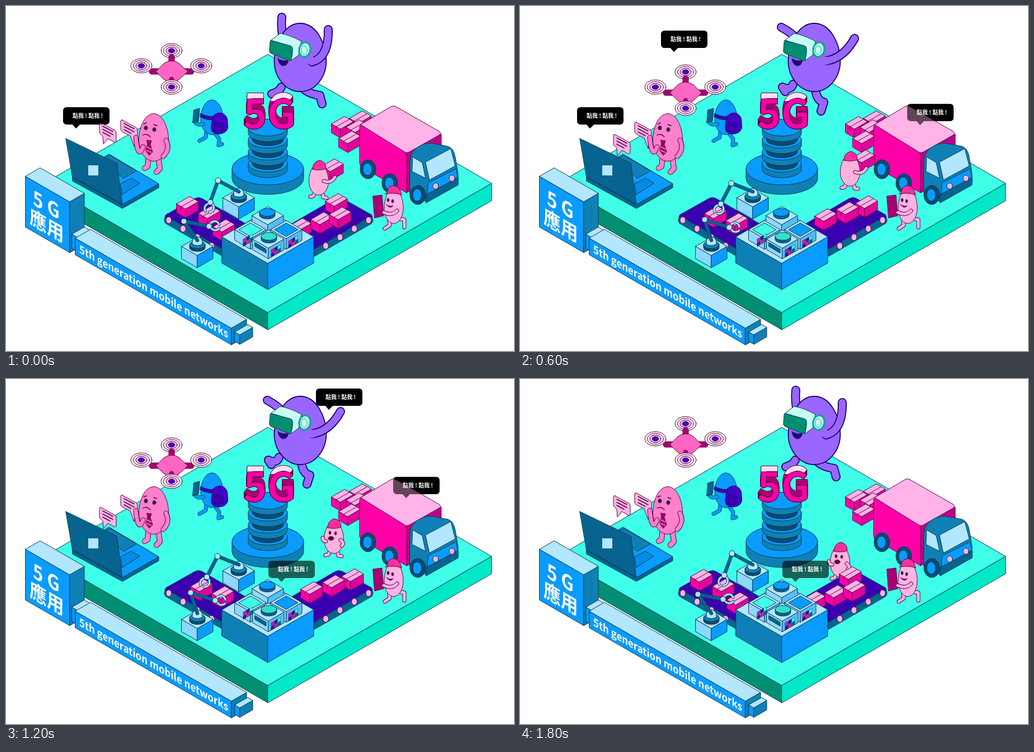
These frames come from a looping animation (908 by 617 pixels, 2100 ms). An HTML page:

```html
<!DOCTYPE html>
<html lang="zh-Hant">
<head>
<meta charset="utf-8">
<title>5G</title>
<style>
html, body { margin: 0; width: 100%; height: 100%; overflow: hidden; background: #fff; }
svg { display: block; }
text { font-family: "Noto Sans CJK TC", "Noto Sans CJK", "Noto Sans", sans-serif; font-weight: 700; stroke: none; fill: #fff; white-space: pre; }
</style>
</head>
<body>
<svg id="stage" width="908" height="617" viewBox="0 0 908 617" stroke="#063a55" stroke-linejoin="round" stroke-linecap="round"></svg>
<script>
const STEP = 300, STEPS = 7;
const sky = '#b3e6ff', blue = '#0a9bff', steel = '#0f80b5', deep = '#07638f', night = '#0a4a70';
const pale = '#ffb3e6', rose = '#ff80cc', hot = '#ff00a8', wine = '#a80074', plum = '#5c0040';
const violet = '#9966ff', indigo = '#3a00b0', dark = '#1a0066';
const aqua = '#3fffe8', green = '#008f72';

// drawing helpers
const path = (d, fill = 'none', more = '') => `<path d="${d}" fill="${fill}" ${more}/>`;
const poly = (pts, fill, more = '') => `<polygon points="${pts}" fill="${fill}" ${more}/>`;
const oval = (x, y, rx, ry, fill, more = '') => `<ellipse cx="${x}" cy="${y}" rx="${rx}" ry="${ry}" fill="${fill}" ${more}/>`;
const group = (x, y, body, more = '') => `<g transform="translate(${x} ${y})" ${more}>${body}</g>`;
const ink = color => `stroke="${color}"`;
const line = (d, color, w) => path(d, 'none', `stroke="${color}" stroke-width="${w}"`);
const limb = (d, color, w, edge = night, rim = 2) => line(d, edge, w + rim) + line(d, color, w);
const repeat = (n, f) => Array.from({ length: n }, (_, i) => f(i)).join('');

// block whose nearest top corner is x,y; l and r reach left and right
function block(x, y, l, r, h, [top, left, right], more = '') {
  const k = 0.577, a = [x - l, y - l * k], b = [x + r, y - r * k];
  return `<g ${more}>` +
    poly([a, [x, y], [x, y + h], [a[0], a[1] + h]].join(' '), left) +
    poly([[x, y], b, [b[0], b[1] + h], [x, y + h]].join(' '), right) +
    poly([a, [x - l + r, y - (l + r) * k], b, [x, y]].join(' '), top) + '</g>';
}

function egg(x, y, w, h, fill, more = '') {
  return path(`M${x},${y - h}c${.62 * w},0 ${w},${.6 * h} ${w},${1.1 * h}s${-.45 * w},${.9 * h} ${-w},${.9 * h}` +
    `s${-w},${-.4 * h} ${-w},${-.9 * h}s${.38 * w},${-1.1 * h} ${w},${-1.1 * h}z`, fill, more);
}

const isoText = (x, y, size, s) =>
  `<text transform="matrix(.866 .5 0 1 ${x} ${y})" font-size="${size}">${s}</text>`;

const parcel = ([x, y]) =>
  block(x - 3, y + 2, 16, 23, 16, [pale, hot, '#e0059a'], ink(plum)) +
  line(`M${x - 11},${y - 2}l23,-13m-23,13v6`, plum, 1);

function ground() {
  return block(468, 548, 400, 400, 31, [aqua, green, '#00e8c6']);
}

function sign() {
  const faces = [sky, blue, steel];
  return block(114, 350, 79, 26, 91, faces) +
    isoText(48, 355, 36, '5 G') + isoText(42, 388, 35.5, '應用') +
    block(132, 416, 14, 22, 26, faces) +
    block(403, 576, 279, 27, 30, faces) +
    isoText(131, 441, 19.5, '5th generation mobile networks') +
    block(418, 588, 9, 23, 17, faces);
}

function truck() {
  const wheel = (x, y) => oval(x, y, 14, 17, night) + oval(x - 1, y, 8, 11, blue);
  return [[633, 208], [601, 218], [627, 224], [614, 244]].map(parcel).join('') +
    `<g ${ink(plum)}>` +
    path('M716,263L778,229V300L716,334Z', '#c00085') +
    path('M632,217Q632,212 637,214L711,258Q716,261 716,268V334L636,288Q632,285 632,279Z', hot) +
    path('M634,212L688,180Q692,177 697,180L774,224Q779,228 774,231L721,261Q716,264 711,260Z', pale) + '</g>' +
    wheel(647, 292) + wheel(686, 317) +
    path('M722,275Q724,258 740,250Q752,243 770,247L790,251Q800,254 803,270L808,300V318L752,350Q738,345 722,335Z', steel) +
    poly('727,270 744,280 750,308 726,296', sky) +
    poly('750,279 795,255 803,286 757,311', sky) +
    poly('755,316 805,291 807,307 753,337', blue) +
    poly('751,337 808,307 808,320 751,352', deep) +
    oval(768, 322, 5, 5.5, pale) + oval(797, 308, 5, 5.5, pale) + wheel(736, 338);
}

const leap = [
  { left: 'M496,62Q491,40 493,20', right: 'M547,100Q577,92 576,42', legs: ['M492,145Q488,154 475,157', 'M534,150Q545,158 561,160L565,175'] },
  { left: 'M498,62Q491,45 478,27', right: 'M547,99Q575,92 587,48', legs: ['M492,145Q488,158 470,151', 'M533,150Q540,168 553,166L549,184'] },
  { left: 'M496,60Q486,48 467,38', right: 'M547,98Q578,94 598,58', legs: ['M488,140Q484,152 469,145L474,153', 'M528,150Q531,170 543,172L538,188'] },
  { left: 'M498,62Q491,44 477,30', right: 'M547,98Q584,92 603,64', legs: ['M492,143Q488,154 472,156', 'M533,150Q540,168 553,166L549,184'] }
];

function jumper(p) {
  const { left, right, legs } = leap[p], arm = d => limb(d, violet, 12.5, dark, 3.5);
  const mouth = p == 3 ? oval(489, 103, 6, 6, '#2b0080')
    : path(`M486,94Q496,100 505,97Q503,${p == 1 ? 113 : 108} 494,${p == 1 ? 111 : 107}Q487,104 486,94Z`, '#2b0080');
  return [left, ...legs].map(arm).join('') +
    egg(526, 92, 46.5, 61, violet, `stroke="${dark}" stroke-width="1.8"`) +
    mouth + arm(right) + oval(546, 98, 8, 7.5, violet, 'stroke="none"') +
    path('M474,61L490,49Q505,51 528,63L523,88L509,98Q514,82 511,73Z', '#c5fff5') +
    path('M474,62L508,71Q513,73 512,79L510,95Q509,99 504,97L474,85Q470,83 471,78L472,65Q472,61 474,62Z', green) +
    oval(534, 78, 10, 13, '#c5fff5', `stroke="#00a98c" stroke-width="3" transform="rotate(12 534 78)"`) +
    oval(533, 79, 5.5, 8, '#c5fff5', ink('#00a98c'));
}

function tower() {
  const disc = (y, rx, ry, h) =>
    path(`M${468 - rx},${y}v${h}a${rx},${ry} 0 0 0 ${2 * rx},0v${-h}`, steel) + oval(468, y, rx, ry, blue);
  const glyphs = (dy, more) => `<text x="424" y="${219 - dy}" font-size="72" ${more}>5G</text>`;
  const edge = `style="fill:${plum};stroke:${plum};stroke-width:1.8"`;
  return disc(291, 64, 29, 17) +
    repeat(4, i => disc(282 - 21.5 * i, 35, 15, 10) +
      (i < 3 ? path(`M440,${282 - 21.5 * i}a28,11 0 0 0 56,0v-8h-56z`, night) : '')) +
    `<linearGradient id="depth" gradientUnits="userSpaceOnUse" x1="0" y1="154" x2="0" y2="220">
      <stop offset=".24" stop-color="#ffe0f4"/><stop offset=".24" stop-color="${wine}"/></linearGradient>` +
    repeat(11, i => glyphs(i, edge)) +
    repeat(11, i => `<text x="424" y="${209 + i}" font-size="72" style="fill:${i ? wine : 'url(#depth)'}" opacity="${i ? 0 : 1}">5G</text>`) +
    glyphs(0, `style="fill:${hot};stroke:${plum};stroke-width:1"`);
}

function hiker() {
  return limb('M358,224L357,235L346,241', blue, 5) + limb('M371,224L381,238L380,249L386,247', blue, 5) +
    egg(368, 199, 20, 31, blue) +
    path('M348,192Q360,199 372,197L371,204Q356,204 347,198Z', indigo) +
    path('M371,196Q380,188 389,193Q397,198 396,210Q399,222 389,227Q377,232 369,225Q364,218 371,196Z', '#4500c8', ink(dark)) +
    path('M373,208Q382,205 388,210V221Q380,227 371,222Z', indigo, ink(dark)) +
    limb('M352,211Q342,214 338,207', blue, 5) +
    poly('336,186 346,183 344,206 334,209', deep);
}

// courier position per step; the first three carry a parcel
const route = [[559, 310], [590, 298], [590, 294], [590, 271], [586, 284], [587, 297], [572, 326]];

function courier(step) {
  const [x, y] = route[step], carry = step < 3, skin = '#ffb3dc';
  const part = d => limb(d, skin, 5, plum);
  const legs = step % 2
    ? part('M-5,22L-6,30L-14,28') + part('M6,22L13,28L11,34L15,34')
    : part('M-6,22L-10,30L-15,31') + part('M6,22L8,32L14,33');
  const face = carry ? '' : oval(-7, -9, 1.8, 3, plum) + oval(3, -8, 1.8, 3, plum) + oval(-5, 1, 5, 3.5, plum) + part('M-14,6Q-20,6 -20,0');
  return group(x, y, legs + (carry ? parcel([24, -16]) : '') +
    egg(0, 0, 17.5, 28, skin) + face +
    path('M-11,-18Q-11,-31 1,-34Q13,-32 13,-19Q2,-15 -11,-18Z', '#ff2e9e') +
    (carry ? part('M9,3Q22,8 29,-4') : part('M12,4Q20,10 14,14')), ink(plum));
}

function laptop() {
  return poly('119,306 184,265 273,318 273,325 208,362 119,313', deep) +
    poly('119,306 184,265 273,318 208,355', blue) +
    poly('172,274 186,267 233,295 210,308', steel) +
    poly('205,318 224,308 239,317 208,337', '#078be6') +
    poly('107,237 198,281 208,355 119,306', deep) +
    line('M119,306L208,355', night, 2) +
    `<rect x="147" y="285" width="18" height="18" fill="${sky}" stroke="none"/>`;
}

// chat notes: [column, top]; column 0 points left, column 1 points right
const notes = [
  [[0, 208], [1, 203]],
  [[0, 173], [1, 168], [1, 249]],
  [[0, 229], [1, 207]],
  [[0, 189], [1, 167], [0, 231]]
];

function note([col, y]) {
  const tail = col ? 'L26,33L24,48L17,29' : 'L15,29L7,39L6,25';
  return group(col ? 205 : 167, y,
    path(`M3,1L27,14Q30,16 30,19V33Q30,37 26,35${tail}L3,22Q0,20 0,17V3Q0,0 3,1Z`, pale) +
    repeat(3, i => line(`M6,${7 + i * 5.5}l${i == 2 ? 13 : 18},${i == 2 ? 7 : 9.5}`, plum, 1.6)), ink(plum));
}

function worker(p) {
  const part = (d, w = 8) => limb(d, rose, w, plum);
  return part('M255,268L253,287L248,290') + part('M272,268L275,291L269,297') +
    egg(264, 235, 26.5, 42.5, rose, ink(plum)) +
    part('M286,240Q294,256 281,269', 7) +
    part(p % 2 ? 'M242,236Q225,250 237,264' : 'M245,252Q236,276 232,235', 7) +
    oval(250, 218, 3, 3.5, plum) + oval(265, 221, 3, 3.5, plum) +
    line('M246,211l5,-2M264,212l6,2M245,231q6,-4 13,3', plum, 1.4) +
    poly('252,240 260,241 258,247 253,246', wine, ink(plum)) +
    poly('253,247 258,248 262,261 256,267 250,259', wine, ink(plum)) +
    line('M252,252l8,4M251,258l9,4', pale, 1.2);
}

const flight = [[296, 117], [277, 142], [296, 155], [336, 136]];

function drone(p) {
  const arms = limb('M-35,0H35M0,-25V23', wine, 9, plum);
  const rotor = (x, y) => group(x, y, [19, 14.5, 10].map((r, i) => oval(0, 0, r, r * .68, i == 2 ? pale : '#fff0fa')).join('') +
    oval(0, 0, 5.5, 4, '#4500c8', ink(dark)));
  return group(...flight[p], rotor(0, -37) + arms +
    path('M-28,0Q-22,-6 -14,-14Q0,-24 14,-14Q22,-6 29,0Q22,7 14,14Q0,24 -14,14Q-22,7 -28,0Z', '#ff66c4') +
    line('M0,14V24', wine, 9) + rotor(-54, -10) + rotor(53, -10) + rotor(0, 28), ink(plum));
}

// parcels on the two belts
const loads = [
  [[324, 361], [363, 378], [389, 402], [590, 356], [526, 400], [564, 389], [597, 380]],
  [[341, 373], [379, 387], [406, 413], [603, 346], [609, 372], [577, 382], [537, 392]],
  [[349, 378], [387, 391], [619, 360], [585, 371], [546, 383]]
];

function belts(p) {
  const belt = limb('M291,383L390,440', deep, 15) +
    path('M284,378Q284,373 290,371L338,344Q344,341 350,344L450,402L400,442L294,380Z', indigo) +
    repeat(4, i => oval(291 + 25.5 * i, 383 + 15.3 * i, 5, 6, pale, ink(plum)));
  return belt + `<g transform="translate(939) scale(-1 1)">${belt}</g>` + loads[p % 3].map(parcel).join('');
}

function machine() {
  const cell = (x, y) => block(x, y, 28, 28, 19, [sky, '#8ed8ff', '#55bdf5']);
  const button = (x, y, fill) => path(`M${x - 14},${y}v5a14,7 0 0 0 28,0v-5`, deep) + oval(x, y, 14, 7, fill);
  const screen = (x, y, fill) => poly(`${x - 21},${y} ${x},${y - 12} ${x + 21},${y} ${x},${y + 12}`, fill);
  const keys = (x, y, s) => repeat(6, i => {
    const u = x + s * (i % 3) * 6, v = y - (i % 3) * 3.4 + (i > 2 ? 7 : 0);
    return poly(`${u},${v} ${u + s * 5},${v - 3} ${u + s * 5},${v + 3} ${u},${v + 6}`, [hot, indigo, aqua, indigo, hot, deep][i], 'stroke-width=".5"');
  });
  return block(468, 460, 82, 82, 47, [sky, steel, blue]) +
    cell(468, 391) + button(467, 369, blue) +
    cell(437, 416) + screen(437, 400, aqua) + keys(424, 417, 1) +
    cell(501, 416) + screen(501, 400, blue) + keys(505, 420, 1) +
    cell(469, 433) + button(470, 412, '#2fe0cb') +
    poly('445,423 465,435 465,442 445,430', deep) + keys(474, 436, 1);
}

// elbow, wrist and claw angle of both arms
const poses = [
  [[379, 312, 365, 351, 105], [318, 385, 363, 394, 0]],
  [[389, 303, 354, 325, 165], [303, 403, 341, 372, -45]],
  [[378, 317, 359, 354, 115], [330, 382, 374, 396, 5]],
  [[385, 307, 355, 336, 125], [334, 382, 372, 365, -30]]
];

function robots(p) {
  const robot = (x, y, [ex, ey, wx, wy, turn]) =>
    block(x, y + 24, 28, 28, 22, [sky, '#8ed8ff', blue]) +
    path(`M${x - 14},${y + 5}v5a14,7 0 0 0 28,0v-5`, night) + oval(x, y + 5, 14, 7, steel) +
    path(`M${x - 9},${y + 4}v-4a9,9 0 0 1 18,0v4q-9,5 -18,0`, sky) +
    limb(`M${x},${y - 3}L${ex},${ey}L${wx},${wy}`, deep, 4.5) +
    oval(ex, ey, 5, 5, sky) +
    `<g transform="translate(${wx} ${wy}) rotate(${turn})">` +
    limb('M0,0C3,-11 15,-12 18,-3M2,0C5,8 13,9 18,4', sky, 3) + '</g>' + oval(wx, wy, 5, 5, sky);
  const [a, b] = poses[p];
  return robot(416, 335, a) + robot(342, 422, b);
}

function caller() {
  const part = d => limb(d, pale, 5, plum);
  return `<g ${ink(plum)}>` + part('M685,382L686,392L677,398') + part('M699,380L712,382L712,396') +
    egg(693, 358, 17, 31, pale) +
    path('M681,334Q683,321 693,321Q705,323 707,338Q696,333 678,336Z', '#ff2e9e') +
    oval(683, 347, 1.8, 3, plum) + oval(691, 349, 1.8, 3, plum) +
    path('M680,355Q686,360 692,357Q687,364 680,355Z', plum) +
    poly('656,340 672,338 675,375 659,379', wine) +
    part('M699,366Q690,376 675,369') + '</g>';
}

// prompts: place, first and last step shown
const prompts = [[102, 181, 0, 2], [252, 44, 1, 3], [692, 175, 2, 4], [554, 17, 4, 5], [469, 325, 4, 6]];

function bubbles(step, opacity, words) {
  return prompts.filter(b => step >= b[2] && step <= b[3]).map(([x, y]) => group(x, y,
    path('M7,0H76Q83,0 83,7V24Q83,31 76,31H30L23,38L17,31H7Q0,31 0,24V7Q0,0 7,0Z', '#000', `stroke="none" opacity="${opacity}"`) +
    (words ? '<text x="17" y="19" font-size="10">點我 ! 點我 !</text>' : ''))).join('');
}

function scene(step) {
  const p = Math.min(step, 6 - step);
  return bubbles(step, 1, false) + ground() + sign() + truck() + jumper(p) + tower() + hiker() +
    courier(step) + laptop() + notes[p].map(note).join('') + worker(p) + drone(p) +
    belts(p) + machine() + robots(p) + caller() + bubbles(step, 0.62, true);
}

const stage = document.getElementById('stage');
let shown = -1;
function tick() {
  const step = Math.floor(performance.now() / STEP) % STEPS;
  if (step !== shown) stage.innerHTML = scene(shown = step);
  requestAnimationFrame(tick);
}
tick();
</script>
</body>
</html>
```
